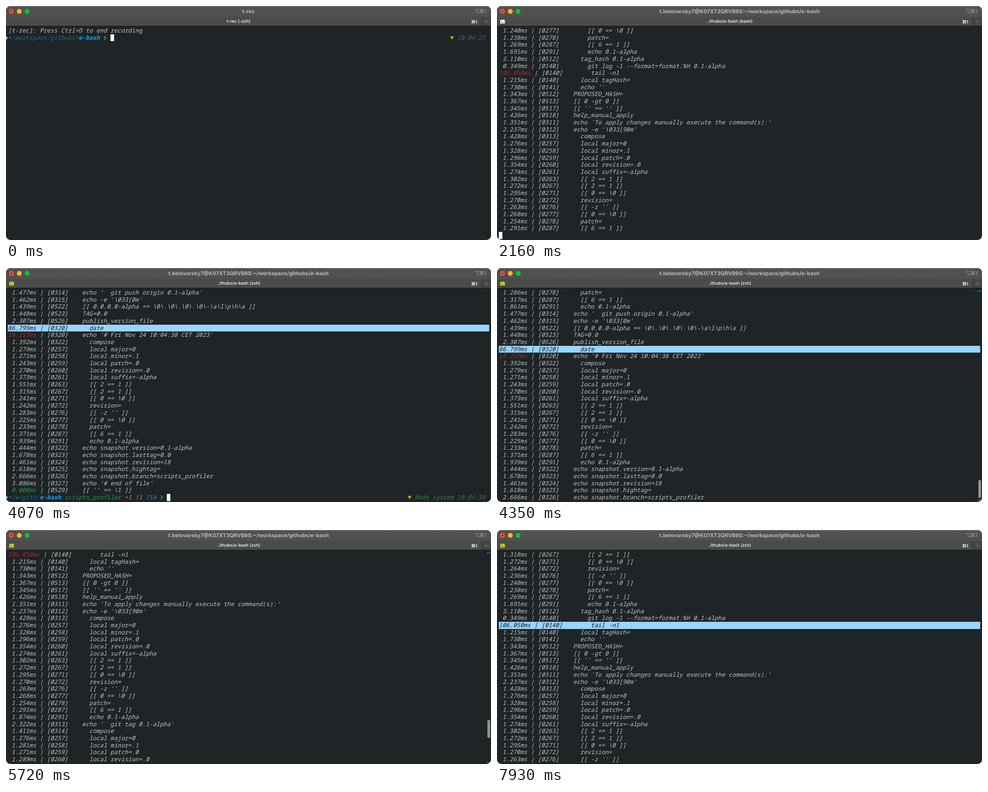
An HTML page that plays this animation: 1077x520 px, repeating every 8.21 s.

```html
<!DOCTYPE html>
<html lang="en">
<head>
<meta charset="utf-8">
<title>Terminal session</title>
<style>
  :root { --cw: 7.855px; --rh: 15.69px; }
  html, body { margin: 0; width: 100%; height: 100%; overflow: hidden; background: #fff; }
  .win {
    position: relative; width: 1077px; height: 520px; overflow: hidden;
    border-radius: 10px; background: #1f2427; text-rendering: geometricPrecision;
  }
  .win > *, .row, .right, .bar, .mark { position: absolute; }
  .chrome {
    inset: 0 0 auto; height: 44px; border-bottom: 1px solid #161819;
    background: linear-gradient(#8a8a88 1px, #525250 1px, #50504e 24px, #4b4b49 24px);
  }
  .plus { left: 1056px; top: 25px; width: 21px; height: 19px; background: #454543; border-left: 1px solid #2a2b2b; }
  .title, .tab {
    left: 0; text-align: center; white-space: pre;
    font-family: Inter, "Open Sans", sans-serif;
  }
  .title { width: 1077px; top: 4px; font-size: 11.65px; font-weight: 700; line-height: 16px; color: #b9b9b7; }
  .tab { width: 1033px; top: 27px; font-size: 9.6px; font-weight: 500; line-height: 16px; color: #fff; }
  .art { left: 0; top: 0; }
  .art text { font-family: Inter, sans-serif; font-weight: 600; }
  .screen {
    left: 4.3px; top: 47.1px; color: #bfc3c3; white-space: pre;
    font: italic 13.09px/15.69px "Noto Sans Mono", "DejaVu Sans Mono", monospace;
  }
  .row { left: 0; height: var(--rh); }
  .right { top: 0; }
  .bar { left: 0; top: 0; height: var(--rh); overflow: hidden; background: #9ad4ff; color: #14181a; }
  .cur { display: inline-block; width: 8px; height: var(--rh); background: #fff; vertical-align: top; }
  .g { width: var(--cw); height: var(--rh); vertical-align: top; overflow: visible; }
  .mark { left: -4.3px; top: 0; width: 5px; height: var(--rh); }
  .home { color: #12a5f4; font-weight: 700; }
  .path { color: #0b719d; }
  .git, .ok { color: #12a537; }
  .mod { color: #c29a2c; }
  .new { color: #149be6; }
  .cmd { color: #1c9f45; }
  .node { color: #2f8a35; }
  .time { color: #41696c; }
  .slow { color: #a02f2b; }
  .scroll div { position: absolute; }
  .thumb { left: 1069px; width: 6px; height: 40px; border-radius: 3px; background: #929597; }
  .tick { left: 1067px; width: 9px; height: 2px; }
</style>
</head>
<body>
<div class="win">
  <div class="chrome"></div>
  <div class="plus"></div>
  <svg class="art" width="1077" height="46" fill="none">
    <circle cx="12" cy="12" r="5.4" fill="#ff4d4a"/>
    <circle cx="12" cy="12" r="1.8" fill="#7a0a0c"/>
    <circle cx="29.5" cy="12" r="5.4" fill="#fdb32f"/>
    <circle cx="47" cy="12" r="5.4" fill="#0fc040"/>
    <path d="M1062 35H1072M1067 30V40" stroke="#777775"/>
    <g stroke="#8b8b89" stroke-width="1.3">
      <path d="M1041 7.5H1044L1048 15H1051M1047 7.5H1051"/>
      <use href="#key" x="1052" y="6.7"/>
    </g>
    <text x="1062" y="15.5" font-size="11.5" fill="#8b8b89">1</text>
    <g stroke="#fff" stroke-width="1.2"><use href="#key" transform="translate(1034 31.2) scale(.84)"/></g>
    <text x="1042.3" y="38.6" font-size="9.6" fill="#fff">1</text>
    <g id="icon">
      <rect x="7" y="30.5" width="10.5" height="8.5" rx="1.5"/>
      <path d="M9 32.6L11 34.5L9 36.4M12 36.8H15" stroke="#444442"/>
    </g>
    <defs>
      <path id="key" d="M3 3H6V6H3ZM3 3V1.7A1.3 1.3 0 1 0 1.7 3H3M6 3H7.3A1.3 1.3 0 1 0 6 1.7V3M6 6V7.3A1.3 1.3 0 1 0 7.3 6H6M3 6H1.7A1.3 1.3 0 1 0 3 7.3V6"/>
    </defs>
  </svg>
  <div class="title" id="title"></div>
  <div class="tab" id="tab"></div>
  <div class="screen" id="screen"></div>
  <div class="scroll" id="scroll">
    <div class="tick" style="top:50px;background:#1767a8"></div>
    <div class="thumb" id="thumb"></div>
    <div class="tick" style="top:515px;background:#5b6063"></div>
  </div>
</div>
<script>
const LOOP = 8210, CW = 7.855, RH = 15.69, ROWS = 30, FULL = 136;
const $ = id => document.getElementById(id);

// Each line: milliseconds, script line, indent level, command
const log = String.raw`
1.318 0267 2 [[ 2 == 1 ]]
1.272 0271 2 [[ 0 == \0 ]]
1.264 0272 2 revision=
1.236 0276 2 [[ -z '' ]]
1.240 0277 2 [[ 0 == \0 ]]
1.238 0278 2 patch=
1.269 0287 2 [[ 6 == 1 ]]
1.691 0291 2 echo 0.1-alpha
3.110 0512 1 tag_hash 0.1-alpha
0.349 0140 2 git log -1 --format=format:%H 0.1-alpha
106.050 0140 2 tail -n1
1.215 0140 1 local tagHash=
1.730 0141 1 echo ''
1.343 0512 0 PROPOSED_HASH=
1.367 0513 0 [[ 0 -gt 0 ]]
1.345 0517 0 [[ '' == '' ]]
1.426 0518 0 help_manual_apply
1.351 0311 0 echo 'To apply changes manually execute the command(s):'
2.237 0312 0 echo -e '\033[90m'
1.428 0313 1 compose
1.276 0257 1 local major=0
1.328 0258 1 local minor=.1
1.296 0259 1 local patch=.0
1.354 0260 1 local revision=.0
1.274 0261 1 local suffix=-alpha
1.302 0263 1 [[ 2 == 1 ]]
1.272 0267 1 [[ 2 == 1 ]]
1.295 0271 1 [[ 0 == \0 ]]
1.270 0272 1 revision=
1.263 0276 1 [[ -z '' ]]
1.268 0277 1 [[ 0 == \0 ]]
1.254 0278 1 patch=
1.291 0287 1 [[ 6 == 1 ]]
1.874 0291 1 echo 0.1-alpha
2.322 0313 0 echo '  git tag 0.1-alpha'
1.411 0314 1 compose
1.276 0257 1 local major=0
1.281 0258 1 local minor=.1
1.271 0259 1 local patch=.0
1.289 0260 1 local revision=.0
1.306 0261 1 local suffix=-alpha
1.282 0263 1 [[ 2 == 1 ]]
1.337 0267 1 [[ 2 == 1 ]]
1.329 0271 1 [[ 0 == \0 ]]
1.326 0272 1 revision=
1.315 0276 1 [[ -z '' ]]
1.256 0277 1 [[ 0 == \0 ]]
1.286 0278 1 patch=
1.317 0287 1 [[ 6 == 1 ]]
1.861 0291 1 echo 0.1-alpha
1.477 0314 0 echo '  git push origin 0.1-alpha'
1.462 0315 0 echo -e '\033[0m'
1.439 0522 0 [[ 0.0.0.0-alpha == \0\.\0\.\0\.\0\-\a\l\p\h\a ]]
1.448 0523 0 TAG=0.0
2.307 0526 0 publish_version_file
86.799 0320 1 date
18.257 0320 0 echo '# Fri Nov 24 10:04:38 CET 2023'
1.392 0322 1 compose
1.279 0257 1 local major=0
1.271 0258 1 local minor=.1
1.243 0259 1 local patch=.0
1.270 0260 1 local revision=.0
1.373 0261 1 local suffix=-alpha
1.551 0263 1 [[ 2 == 1 ]]
1.315 0267 1 [[ 2 == 1 ]]
1.241 0271 1 [[ 0 == \0 ]]
1.242 0272 1 revision=
1.283 0276 1 [[ -z '' ]]
1.225 0277 1 [[ 0 == \0 ]]
1.233 0278 1 patch=
1.371 0287 1 [[ 6 == 1 ]]
1.939 0291 1 echo 0.1-alpha
1.444 0322 0 echo snapshot.version=0.1-alpha
1.678 0323 0 echo snapshot.lasttag=0.0
1.461 0324 0 echo snapshot.revision=18
1.618 0325 0 echo snapshot.hightag=
2.666 0326 0 echo snapshot.branch=scripts_profiler
3.086 0327 0 echo '# end of file'
0.000 0529 0 [[ '' == \1 ]]`.trim().split("\n").map(line => {
  const [, ms, num, level, cmd] = line.match(/^(\S+) (\d+) (\d) (.*)$/);
  return {
    cls: ms > 10 ? "slow" : +ms ? "" : "ok",
    time: (ms + "ms").padStart(8),
    rest: ` | [${num}]${" ".repeat(4 + 2 * level)}${cmd}`
  };
});

const span = (cls, text) => `<span class="${cls}">${text}</span>`;
const glyph = shape => `<svg class="g" viewBox="0 0 7.855 15.69">${shape}</svg>`;
const chevron = glyph('<path d="M2 3.8L5.6 8L2 12.2" fill="none" stroke="#22c52e" stroke-width="1.8"/>');
const arrow = glyph('<path d="M0 4.4H8.6L4.3 12Z" fill="#dca22c"/>');
const marker = '<svg class="mark" viewBox="0 0 5 15.69"><path d="M0 3L4.6 8L0 13Z" fill="#70b5e8"/></svg>';
const cursor = '<span class="cur"></span>';

const command = "bin/profiler/profile.sh bin/version-up.sh";
const exe = command.indexOf(" ");

function prompt(path, git, typed, clock, showCursor = true) {
  const status = git
    ? span("git", "scripts_profiler ") + span("mod", "+1 !1 ") + span("new", "?14 ") : "";
  const col = git ? 113 : 125;
  return marker + span("home", "~") + span("path", path) + span("home", "e-bash ") + status +
    chevron + " " + span("cmd", command.slice(0, Math.min(typed, exe))) +
    command.slice(exe, Math.max(typed, exe)) + (showCursor ? cursor : "") +
    `<span class="right" style="left:${col * CW}px">${arrow} ` +
    (git ? span("node", "Node system ") : "") + span("time", clock) + "</span>";
}

function logRow(line, cols) {
  const bar = cols
    ? `<div class="bar" style="width:${cols === FULL ? 1068.7 : cols * CW}px">${line.time + line.rest}</div>` : "";
  return span(line.cls, line.time) + line.rest + bar;
}

function rows(s) {
  if (s.mode === "type") {
    const out = ["[t-rec]: Press Ctrl+D to end recording",
      prompt("/workspace/githubs/", s.git, s.typed, "10:04:25", !s.sent)];
    return s.sent ? [...out, cursor] : out;
  }
  const all = log.map((line, i) => logRow(line, i === s.row ? s.cols : 0));
  if (s.mode === "run") return [...all.slice(s.top, s.top + ROWS - 1), cursor];
  return [...all, prompt("/w/gith/", true, 0, "10:04:38")].slice(s.top, s.top + ROWS);
}

// Every step changes only what it names; the rest carries over
const DATE = 55, TAIL = 10;
const changes = [
  { mode: "type", git: false, typed: 0, title: "t-rec", tab: "t-rec (-zsh)", icon: "" },
  { git: true, typed: 3, title: "t.belovarsky7@K07XT3QRVB9S:~/workspace/githubs/e-bash", tab: "..ithubs/e-bash (zsh)" },
  ...[13, 23, 30, 37, 41].map(typed => ({ typed })),
  { sent: true, tab: "..ithubs/e-bash (bash)", icon: "#f4f4f4" },
  { mode: "run", top: 4 },
  { top: 34 },
  { mode: "log", top: 50 },
  { tab: "..ithubs/e-bash (zsh)", icon: "#c2d32c" },
  ...[3, 9, 18, FULL].map(cols => ({ row: DATE, cols })),
  { top: 47, scroll: true },
  ...[42, 34, 26, 18, 10, 4, 0].map(top => ({ top })),
  { scroll: false },
  ...[3, 9, 18, 29, FULL].map(cols => ({ row: TAIL, cols }))
];

const starts = [0];
for (const [from, to, n] of [[250, 2160, 8], [2430, 4350, 8], [4620, 6550, 8], [6820, 7930, 5]])
  for (let i = 0; i < n; i++)
    starts.push(Math.floor((from + (to - from) * i / (n - 1)) / 10 + 1e-6) * 10);

const states = [];
changes.forEach((c, i) => states.push({ ...states[i - 1], ...c }));

function draw(s) {
  $("title").textContent = s.title;
  $("tab").textContent = s.tab;
  $("icon").style.display = s.icon ? "" : "none";
  $("icon").setAttribute("fill", s.icon);
  $("scroll").style.display = s.scroll ? "" : "none";
  $("thumb").style.top = 454 + (s.top - 34) * 1.33 + "px";
  $("screen").innerHTML = rows(s)
    .map((html, i) => `<div class="row" style="top:${i * RH}px">${html}</div>`).join("");
}

let shown = -1;
function tick() {
  const t = performance.now() % LOOP;
  const now = starts.findLastIndex(start => start <= t);
  if (now !== shown) draw(states[shown = now]);
  requestAnimationFrame(tick);
}
tick();
</script>
</body>
</html>
```
